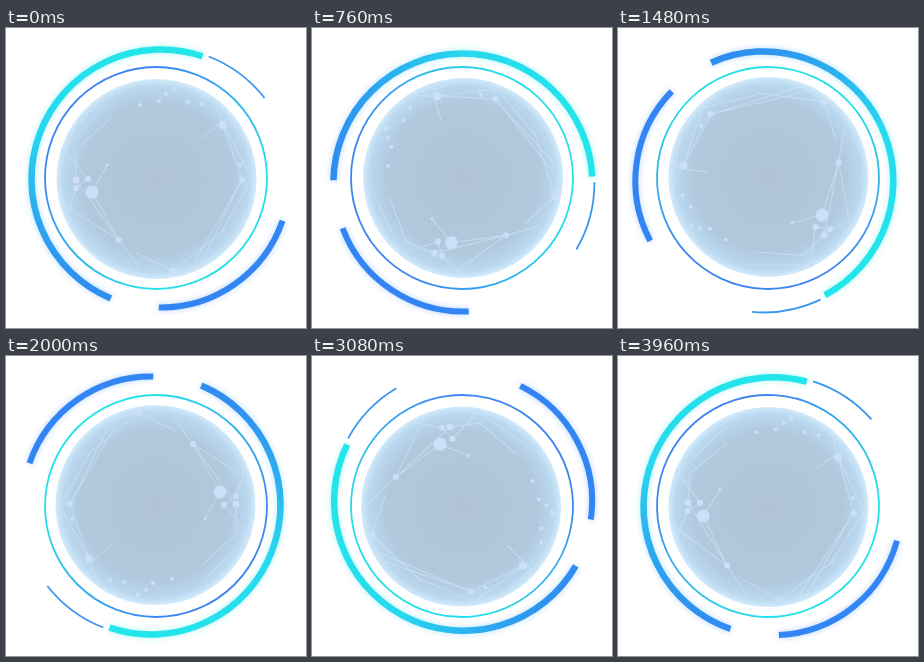
Recreate the animation shown at these times as an HTML page. Size 300x300 px, loop 4 s.

```html
<!DOCTYPE html>
<html lang="en">
<head>
<meta charset="utf-8">
<title>Rotating orb</title>
<style>
  html, body { margin: 0; width: 100%; height: 100%; overflow: hidden; background: #fff; }
  svg { display: block; width: 100vw; height: 100vh; }
</style>
</head>
<body>
<svg viewBox="0 0 300 300" fill="none">
  <defs>
    <linearGradient id="sweep" gradientUnits="userSpaceOnUse" x1="105" y1="270" x2="197" y2="27">
      <stop offset="0" stop-color="#2f8df0"/>
      <stop offset=".5" stop-color="#27d8ee"/>
      <stop offset="1" stop-color="#22e6ea"/>
    </linearGradient>
    <linearGradient id="ringColor" gradientUnits="userSpaceOnUse" x1="72" y1="72" x2="228" y2="228">
      <stop offset=".15" stop-color="#3d86f2"/>
      <stop offset=".85" stop-color="#26e0e8"/>
    </linearGradient>
    <radialGradient id="ball">
      <stop offset="0" stop-color="#b0c3d6"/>
      <stop offset=".75" stop-color="#b1c8dd"/>
      <stop offset=".93" stop-color="#bad8ef"/>
      <stop offset="1" stop-color="#d3ebfb"/>
    </radialGradient>
    <filter id="blur" filterUnits="userSpaceOnUse" x="0" y="0" width="300" height="300">
      <feGaussianBlur stdDeviation="3"/>
    </filter>
    <clipPath id="ballClip"><circle cx="150.5" cy="151" r="100"/></clipPath>
  </defs>

  <g id="inner">
    <circle cx="150.5" cy="151" r="100" fill="url(#ball)"/>
    <g clip-path="url(#ballClip)">
      <path stroke="#cde2f7" opacity=".75" d="
        M103 74L58 122L82 151L70 160L60 190M105 90L70 122V152L113 212L86 164L101 137
        M55 175L113 212L134 240M205 65L217 97L236 152L185 240M195 110L221 90L248 125
        M217 97L246 150L215 205M234 155L195 235M130 225L167 243L220 200M167 243L200 235"/>
      <g id="nodes" fill="#cbdff8"></g>
    </g>
    <circle cx="150" cy="150" r="111" stroke="url(#ringColor)" stroke-width="1.8"/>
  </g>
  <g id="outer">
    <g id="glow" opacity=".35" filter="url(#blur)"></g>
    <g id="arcs"></g>
  </g>
</svg>
<script>
  const LOOP = 4000, STEP = 40;
  const byId = id => document.getElementById(id);

  // The outer arcs share a centre slightly off the pivot, so they wobble as they turn.
  const centre = { x: 155, y: 151 };

  function arc(radius, from, to, color, width) {
    const point = degrees => {
      const a = degrees * Math.PI / 180;
      return `${centre.x + radius * Math.cos(a)} ${centre.y + radius * Math.sin(a)}`;
    };
    const large = to - from > 180 ? 1 : 0;
    return `<path d="M${point(from)}A${radius} ${radius} 0 ${large} 1 ${point(to)}"
      stroke="${color}" stroke-width="${width}"/>`;
  }

  const sweep = arc(129.5, 112.8, 288.7, 'url(#sweep)', 6.5);
  const blue = arc(128.5, 19, 91, '#3285f3', 6);
  const thin = arc(131.5, -68.7, -38, '#3b96ee', 1.8);
  byId('arcs').innerHTML = sweep + blue + thin;
  byId('glow').innerHTML = sweep + blue;

  const nodes = [
    [86, 164, 6.5], [70, 160, 3], [70, 152, 3.5], [82, 151, 3], [113, 212, 3], [58, 122, 3],
    [101, 137, 1.5], [134, 77, 2], [153, 73, 2], [160, 66, 2], [168, 61, 2.5], [182, 74, 2],
    [196, 76, 2], [217, 97, 4], [234, 137, 2], [236, 152, 3], [167, 243, 3.5]
  ];
  byId('nodes').innerHTML = nodes.map(([x, y, r]) => `<circle cx="${x}" cy="${y}" r="${r}"/>`).join('');

  function draw(now) {
    const time = Math.floor(now % LOOP / STEP) * STEP;
    const angle = 360 * time / LOOP;
    byId('outer').setAttribute('transform', `rotate(${angle} 150 150)`);
    byId('inner').setAttribute('transform', `rotate(${-angle} 150 150)`);
  }

  const start = performance.now();
  function tick() {
    draw(performance.now() - start);
    requestAnimationFrame(tick);
  }
  tick();
</script>
</body>
</html>
```
